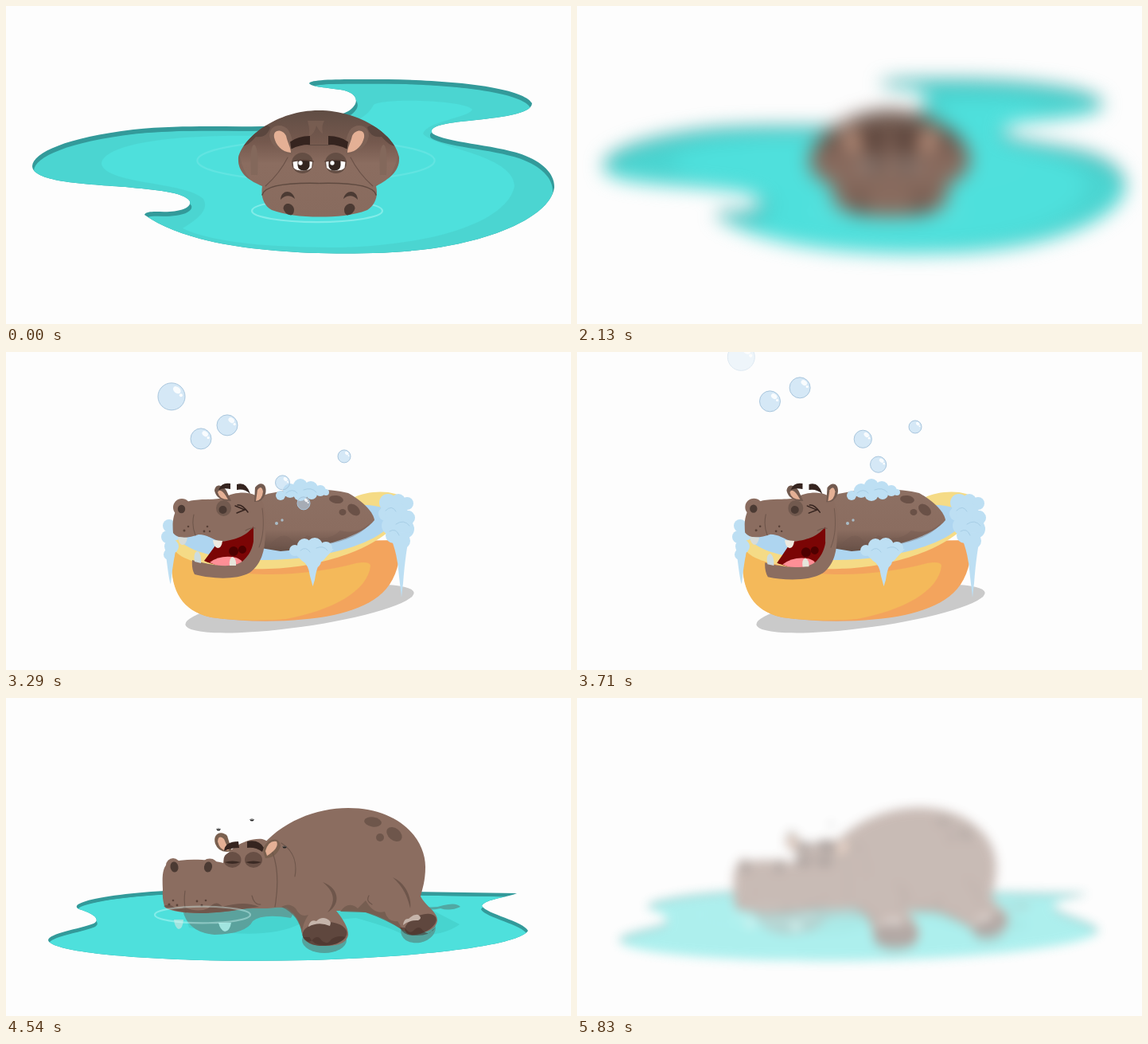
Write an HTML page that moves like this. It is 710x399 px and loops after 5870 ms.

```html
<!DOCTYPE html>
<html lang="en">
<head>
<meta charset="utf-8">
<title>Hippo bath</title>
<style>
  html, body { margin: 0; width: 100%; height: 100%; overflow: hidden; background: #fdfdfd; }
  svg { position: absolute; left: 0; top: 0; width: 710px; height: 399px; }
</style>
</head>
<body>
<script>
const LOOP = 5870;
const SKIN = '#8b6d60', SHADE = '#6e564b', DARK = '#4b3a33', BROW = '#35241f', PINK = '#e4b095';
const WATER = '#4ee0dc', EDGE = '#339a9a', FOAM = '#bddff3';

const path = (d, fill, more = '') => `<path d="${d}" fill="${fill}" ${more}/>`;
const line = (d, color = SHADE, w = 1.3) =>
  `<path d="${d}" fill="none" stroke="${color}" stroke-width="${w}" stroke-linecap="round"/>`;
const oval = (x, y, rx, ry, fill, rot = 0, more = '') =>
  `<ellipse cx="${x}" cy="${y}" rx="${rx}" ry="${ry}" fill="${fill}" transform="rotate(${rot} ${x} ${y})" ${more}/>`;
const group = (id, body) => `<g id="${id}">${body}</g>`;
const mirror = (s, axis) => `${s}<g transform="matrix(-1 0 0 1 ${2 * axis} 0)">${s}</g>`;
const blobs = (list, fill = FOAM) => list.map(([x, y, r]) => oval(x, y, r, r, fill)).join('');
const gradient = (id, stops) =>
  `<linearGradient id="${id}" x2="0" y2="1">${stops.map(([o, c]) =>
    `<stop offset="${o}" stop-color="${c}"/>`).join('')}</linearGradient>`;
const clip = (id, d, x = 0, y = 0) =>
  `<clipPath id="${id}"><path d="${d}" transform="translate(${x} ${y})"/></clipPath>`;

// The bank shows above the lowered water and a little on both sides.
const pool = (id, d, dx, dy, fill, inside = '') =>
  clip(id, d) + clip(id + 'Water', d, -dx, dy) + path(d, EDGE)
  + `<g clip-path="url(#${id})"><g clip-path="url(#${id}Water)">
     ${path(d, fill, `transform="translate(${dx} ${dy})"`)}${inside}</g></g>`;

// Scene 1: head in the pond
const POND = `M33 201C34 184 76 165 160 155C224 149 270 152 322 151C370 148 412 142 430 132
  C447 121 441 108 420 105C398 102 383 101 381 97C383 91 430 92 480 92C560 93 650 102 661 122
  C661 136 618 140 582 144C550 147 530 151 536 160C552 171 612 174 648 186C676 196 690 212 689 228
  C684 262 620 289 560 300C510 310 460 310.500 415 310.500C310 309 222 296 174 262C177 256 192 259 206 258
  C224 257 233 251 231 245C224 233 186 231 150 227C92 223 34 220 33 201Z`;
const POND_LIGHT = `M120 197C124 176 190 161 320 163C410 160 450 148 462 124C474 115 578 118 586 130
  C580 141 530 144 524 160C536 178 638 186 639 226C630 270 540 300 420 303C330 303 260 297 222 279
  C240 268 256 256 248 242C226 220 122 224 120 197Z`;
const FACE_BODY = `M322 226C300 217 291 206 292 190C298 165 340 131 393 131C446 131 490 163 494 190
  C495 207 482 217 465 226C468 238 464 250 454 256C436 263 415 264.500 394 264.500
  C370 264.500 350 262 334 256C323 250 320 238 322 226Z`;

const earFront = path('M331 163C331 149 347 146 355 156C362 168 361 180 359 187C343 184 333 175 331 163Z', '#7d6256')
  + path('M337 165C335 154 348 154 352 163C354 172 358 178 358 184C346 183 339 174 337 165Z', PINK);
const eyeFront = oval(372.500, 197, 13.500, 13, '#644e44')
  + path('M360.500 195Q373 192 385 195L384 203Q380 206.500 373 206.500Q364 206.500 361.500 203Z', '#fff')
  + path('M366.500 194Q374 192.500 381.500 194V201Q380 206.500 374 206.500Q367 206 366.500 200Z', '#33251f')
  + line('M360 195Q373 191.500 386 195', '#594239', 1.5);

const scene1 = `<defs>${gradient('skinTop', [[0, '#604d44'], [0.3, '#75594e'], [0.5, SKIN], [1, '#886b5e']])}</defs>`
  + pool('pond', POND, 2, 5.500, '#4bd5d1', path(POND_LIGHT, WATER) + group('bodyRings', '') + group('faceRings', ''))
  + clip('faceClip', FACE_BODY) + path(FACE_BODY, 'url(#skinTop)')
  + '<g clip-path="url(#faceClip)">'
  + mirror(path('M300 160Q322 144 332 152Q328 166 314 164Q304 176 296 176Z', '#5a463e')
    + path('M308 212Q306 174 312 174Q318 178 316 212Z', '#83685b')
    + path('M292 178Q298 222 322 225L318 230L288 222Z', '#735a4f', 'opacity=".35"'), 393)
  + path('M379 144Q383 158 380 164Q388 160 390 150Q394 158 398 160Q396 150 400 144Z', '#806458', 'opacity=".6"')
  + '</g>'
  + line('M380 174.500H407', '#5f4a41', 1)
  + mirror(line('M354 190Q344 210 326 226', '#6a5147', 1.1)
    + line('M322 237Q326 221 393 222.500', '#5f4a40', 1.5)
    + path('M345 243C346 230 360 230 363 242C356 236 350 238 345 243Z', DARK)
    + path('M348.500 254C349 246 360 246 362 255Q362 262 358 262.500Q350 261 348.500 254Z', DARK), 393.500)
  + group('face', mirror(earFront + eyeFront
    + path('M357 170.500Q367 163 382 163V174Q370 173.500 358.500 179.500Z', BROW), 393.500)
    + oval(370, 197, 2.700, 2.700, '#fff') + oval(410, 197, 2.700, 2.700, '#fff')
    + group('lids', mirror(path('M359 196A13.500 13 0 0 1 386 196Q373 205 359 196Z', '#6a5349'), 393.500)));

// Scene 2: laughing in the tub
const headBath = path(`M210 227C208 205 213 189 236 186C252 184 266 186 275 182C290 174 316 173 323 190
    C328 206 327 222 324 246L311 238V219C302 230 292 235 271 238C262 237 254 229 242 229
    C230 233 217 236 210 227Z`, SKIN)
  + path('M262 174C263 165 272 166 277 174L283 187Q265 187 262 174Z', '#725a4f')
  + path('M266 176Q269 170 276 180L279 185Q268 185 266 176Z', PINK)
  + path('M313 170C319 161 329 165 326 178Q322 189 312 188Z', '#725a4f')
  + path('M316 173Q321 166 323 175Q322 186 314 187Z', PINK)
  + path('M267 173Q271 163 282 165L282 172Q273 170 267 173Z', BROW)
  + path('M290 173V166Q302 162 307 178Q299 171 290 173Z', BROW)
  + oval(221, 195, 11, 11, SKIN) + oval(220.500, 197, 4.700, 5.200, DARK)
  + oval(273.500, 196, 9.500, 10, '#725a4f') + oval(272.500, 198, 5, 5, DARK)
  + line('M288 193L300 198L290 202M291 192Q297 191 304 201', BROW, 1.5)
  + line('M236 204Q233 218 238 230M301 224Q308 220 313 221', SHADE, 1.1)
  + line('M322 196Q326 225 318 245', '#735a4f', 1)
  + blobs([[224, 224, 1.5], [229, 219, 1.3], [249, 225, 1.4], [253, 219, 1.3], [256, 225, 1.2]], '#594238')
  + path('M260 236L272 237Q271 246 266 246Q261 245 260 236Z', '#eee9df')
  + path('M216 232L228 233Q226 243 221 242Q217 240 216 232Z', '#d7dcd9');
const jawBath = path('M311 217C315 247 308 269 290 270C270 270 258 266 249 262Q258 250 268 236Z', '#7b0505')
  + blobs([[286, 250, 6], [297, 248, 5]], '#4e0000')
  + path('M256 264Q270 254 289 258Q300 262 296 268Q276 274 256 264Z', '#ff8f96')
  + path(`M234 261C255 267 285 273 298 262C311 250 313 235 311 218L325 212C328 245 322 266 306 277
    C288 287 255 284 237 279Q233 272 234 261Z`, SKIN)
  + path('M237 263Q235 251 241 250Q246 253 245 265Z', '#ccdce0')
  + path('M281 268Q280 258 285 257Q290 260 289 268Z', '#e6e5db');

const scene2 = `<defs>${gradient('skinBack', [[0, '#8d7063'], [0.65, SKIN], [1, '#664f45']])}</defs>`
  + oval(369, 322, 145, 23, '#cacaca', -8)
  + path('M209 240C204 292 216 324 258 333C312 341 374 338 412 330C462 318 496 300 496 236Z', '#f3a45d')
  + path('M209 246C204 292 216 324 258 333C290 338 330 337 352 335C410 324 455 300 458 268Q457 262 440 265C360 286 260 286 209 246Z', '#f4b95a')
  + path(`M209 240C204 216 300 190 436 183C456 173 490 172 503 186C506 228 420 270 330 272
    C262 274 208 262 209 240Z`, '#f5db86')
  + path(`M214 230C260 200 380 190 450 192C480 192 490 205 486 213C470 240 400 260 330 261
    C270 262 222 250 214 230Z`, '#aed5f0')
  + blobs([[205, 218, 8], [203, 232, 8], [211, 227, 10], [208, 244, 9], [205, 254, 7]])
  + path('M200 246H214Q210 262 207 291Q205 290 200 246Z', FOAM)
  + path('M316 182C348 170 404 170 430 177C450 188 462 202 463 211C448 230 404 245 345 250L308 244Z', 'url(#skinBack)')
  + path('M330 244Q344 226 355 232Q368 246 378 230Q404 240 420 224Q442 230 458 214Q446 234 396 243Z', '#6f584d', 'opacity=".35"')
  + oval(415, 185, 9, 5, '#6a5147', 8) + oval(437, 198, 9, 6, '#6a5147', 40) + oval(423, 201, 4.500, 4, '#6a5147')
  + blobs([[340, 215, 2], [347, 211, 1.7]], '#a9bcc7')
  + blobs([[345, 180, 6], [357, 174, 9], [370, 168, 9], [383, 171, 9], [395, 174, 7], [402, 176, 4], [370, 178, 9], [384, 178, 7]])
  + line('M352 177Q360 170 366 177M374 173Q384 169 390 176', '#a7cee6', 1)
  + blobs([[363, 249, 7], [375, 243, 9], [388, 243, 10], [402, 246, 8], [380, 254, 10], [393, 253, 10], [386, 262, 10]])
  + path('M357 247H412L398 262Q391 265 388 286L385.500 294L382 281Q380 266 372 262Z', FOAM)
  + line('M370 249Q377 243 382 251M390 246Q399 242 404 249', '#a7cee6', 1)
  + blobs([[480, 189, 11], [493, 187, 9], [504, 190, 8], [477, 203, 9], [491, 203, 14], [505, 208, 9], [483, 218, 11],
    [501, 222, 12], [487, 230, 10], [498, 237, 10]])
  + path('M481 228L508 226Q502 250 499 290L497 308L494 282Q492 250 481 228Z', FOAM)
  + line('M477 199Q485 191 490 200M490 216Q500 209 507 218M482 225Q490 220 494 230', '#a7cee6', 1)
  + group('laugh', group('jaw', jawBath) + headBath)
  + group('bubbles', '');

// Scene 3: asleep in a puddle
const PUDDLE = `M53 304C54 295 92 290 110 283C121 277 106 269 92 265C75 257 126 246 200 242
  L510 243L642 245C630 250 600 253 598 261C604 271 650 280 656 292C644 311 520 325 380 329
  C220 333 58 322 53 304Z`;
const BODY = `M300 262L318 190C345 155 390 138 430 138C492 138 527 175 527 212C527 230 523 240 521 249
  C528 262 542 268 542 279C540 296 512 298 498 291C482 280 468 272 452 269C440 267 426 267 415 267
  C424 278 430 288 430 297C428 310 412 311 400 311C385 311 373 305 372 295C370 280 362 269 352 263Z`;
const MUZZLE = `M197 240C196 222 197 212 204 207C226 200 258 203 273 207C275 192 300 175 322 177
  C342 182 344 215 342 262C330 266 306 262 290 266C262 271 214 272 200 263Q196 254 197 240Z`;
const scallops = 'M198 261Q206 257 212 263Q220 266 224 262Q240 270 254 264Q264 252 272 262Q300 254 318 262Q300 264 284 267Q224 275 198 261Z';
const sleepEye = x => oval(x, 203, 11, 10, '#684f45')
  + path(`M${x - 10} 206Q${x} 203 ${x + 10} 206Q${x} 210 ${x - 10} 206Z`, '#3b2a24');
const foot = (x, y, rx, ry, rot) => oval(x, y, rx, ry, '#5f473e', rot)
  + path(`M${x - rx + 1} ${y + 4}q6 9 11 4q7 -8 12 0q7 7 12 -1q8 -6 ${rx * 2 - 38} -3q-8 11 -27 10q-14 0 -18 -10z`, '#453029', 'opacity=".55"');

const scene3 = pool('puddle', PUDDLE, 1, 4.500, WATER,
    path('M230 288Q330 306 372 282L440 276Q490 290 500 298Q550 300 570 284L520 258H220Z', '#45cfcb', 'opacity=".7"'))
  + path('M514 258Q532 266 550 260Q566 256 571 262Q558 268 546 264Q530 268 512 262Z', '#51a8a3')
  + oval(400, 304, 28, 16, '#53a39d') + oval(518, 291, 22, 16, '#53a39d', -12)
  + path('M222 266L346 258Q366 264 358 276Q322 270 310 280Q302 296 262 297Q228 294 222 266Z', '#5ba29d')
  + group('sleeper', path(BODY, SKIN)
    + path('M420 268Q430 254 442 264L452 254Q462 272 476 268Q480 282 492 280L500 292Q478 278 452 269Z', '#715a4e', 'opacity=".8"')
    + path('M346 262Q356 256 364 264Q370 276 380 272Q372 284 372 296Q368 272 346 262Z', '#705a4e', 'opacity=".7"')
    + oval(461, 155.500, 11, 6, SHADE, 8) + oval(488, 171, 11, 7.500, SHADE, 40) + oval(470, 175, 5, 5, SHADE)
    + path('M398 231C418 238 422 258 404 269C414 256 414 244 398 231Z', SHADE)
    + path('M486 225C502 232 510 250 508 264C504 248 500 238 486 225Z', SHADE)
    + line('M346 182C362 192 366 208 363 224M460 259Q452 255 456 248', SHADE, 1.2))
  + foot(400.500, 296, 28, 15, -3) + foot(521, 284, 21, 11, -24)
  + path('M380 287Q382 277 390 280Q396 274 403 277Q410 280 407 286Q393 280 380 287Z', '#c5b4aa')
  + path('M499 285Q500 276 506 277Q512 271 518 272Q524 276 518 279Q508 278 499 285Z', '#c5b4aa')
  + group('sleepHead', path('M263 183C259 171 270 165 278 173L284 192Q268 196 263 183Z', '#79604f')
    + path('M266 180Q267 171 274 177L280 191Q269 193 266 180Z', PINK)
    + path(MUZZLE, SKIN) + oval(210, 210, 9, 9, SKIN) + oval(256, 210, 10, 8.500, SKIN)
    + sleepEye(284.500) + sleepEye(311)
    + path('M274 192Q275 180 292 180L293 188Q282 188 274 192Z', BROW)
    + path('M303 188V180Q318 177 324 188L322 193Q314 187 303 188Z', BROW)
    + path('M323 192C324 178 344 171 345 186C342 196 334 201 326 201Z', '#79604f')
    + path('M326 192Q330 178 340 180Q344 188 328 198Z', PINK)
    + oval(211.500, 212, 5, 6.500, DARK, -10) + oval(254, 212, 5, 6.500, DARK, 10)
    + path(scallops, '#70574c')
    + line('M225 242Q223 256 226 269M335 194C344 218 341 244 338 262M309 248Q312 260 320 259', SHADE, 1.2)
    + blobs([[205, 259, 1.5], [210, 254, 1.3], [215, 260, 1.4], [240, 255, 1.4], [246, 260, 1.5], [251, 254, 1.3]], '#5a4339'))
  + path('M211 278H223Q222 290 217 290Q212 288 211 278Z', '#a1e4df')
  + path('M267 282H283Q281 293 275 293Q269 291 267 282Z', '#a1e4df')
  + group('sleepRings', '')
  + [1, 2, 3].map(i => group('fly' + i, oval(0, 0.500, 2.300, 1, '#222') + line('M-2.500 -.5L-.5 -1.200M.5 -1.200L2.500 -.5', '#555', 0.8))).join('');

document.body.innerHTML = [scene1, scene2, scene3]
  .map((s, i) => `<svg id="scene${i}" viewBox="0 0 710 399">${s}</svg>`).join('');

const el = id => document.getElementById(id);
const scenes = [0, 1, 2].map(i => el('scene' + i));
const clamp = v => Math.max(0, Math.min(1, v));
const ramp = (t, a, b) => clamp((t - a) / (b - a));
const wave = (t, period) => (1 - Math.cos(2 * Math.PI * t / period)) / 2;

// Rings are born every 1680 ms and widen at a steady rate while fading.
function rings(id, x, y, t, birth, start, scale, alpha) {
  let out = '';
  for (let k = 0; k < 3; k++) {
    const age = t - birth - 1680 * k;
    if (age < 0 || age > 2400) continue;
    const rx = (start + 0.0274 * age) * scale;
    const a = alpha * (1 - age / 2400) * ramp(age, 0, 150);
    out += `<ellipse cx="${x}" cy="${y}" rx="${rx}" ry="${rx * 0.172}" fill="none"
      stroke="#d9fffd" stroke-opacity="${a}" stroke-width="2.200"/>`;
  }
  el(id).innerHTML = out;
}

// x, y and radius at 3290 ms, then drift and rise per second
const BUBBLES = [[208, 56, 17, -4, 118], [245, 109, 13, -6, 112], [278, 92, 13, 5, 112],
  [425, 131, 8, 0, 88], [347.5, 164, 9, 28, 130], [374, 190, 8, 11, 116]];
function bubbles(t) {
  const s = (t - 3290) / 1000;
  el('bubbles').innerHTML = BUBBLES.map(([x, y, r, drift, rise], i) => {
    const bx = x + drift * s, by = y - rise * s, size = r + (i > 3 ? 5 * s : 0);
    const a = clamp((by + 5) / 30) * clamp((205 - by) / 12);
    if (a <= 0 || size <= 0) return '';
    return `<g opacity="${a}">` + oval(bx, by, size, size, '#b9d9f1', 0, 'fill-opacity=".58" stroke="#a9c6dd" stroke-width="1"')
      + oval(bx + size * 0.4, by - size * 0.48, size * 0.32, size * 0.23, '#fff', 40, 'opacity=".85"')
      + oval(bx + size * 0.7, by - size * 0.1, size * 0.12, size * 0.12, '#fff') + '</g>';
  }).join('');
}

function draw(t) {
  const swap1 = ramp(t, 2140, 2240), swap2 = ramp(t, 4050, 4150), out = ramp(t, 5620, 5840);
  const alpha = [1 - swap1, swap1 * (1 - swap2), swap2 * (1 - 0.57 * out)];
  const blur = t < 2140 ? 11.5 * ramp(t, 1800, 2130)
    : t < 3000 ? 11.5 * (1 - ramp(t, 2160, 2470))
    : t < 4050 ? 9.5 * ramp(t, 3740, 4040)
    : t < 4500 ? 9.5 * (1 - ramp(t, 4060, 4350)) : 6.5 * out;
  scenes.forEach((s, i) => {
    s.style.visibility = alpha[i] > 0 ? 'visible' : 'hidden';
    s.style.opacity = alpha[i];
    s.style.filter = blur > 0.05 ? `blur(${blur}px)` : 'none';
  });

  if (alpha[0] > 0) {
    rings('faceRings', 391, 257, t, -800, 60, 1, 0.55);
    rings('bodyRings', 389.5, 194, t, -800, 60, 1.82, 0.2);
    el('face').setAttribute('transform', `translate(0 ${2.5 * wave(t, 2260)})`);
    el('lids').setAttribute('opacity', t > 520 && t < 660 ? 1 : 0);
  }
  if (alpha[1] > 0) {
    const open = wave(t - 3290, 500);
    el('laugh').setAttribute('transform', `translate(${5 * open} ${open}) rotate(${1.5 * open} 315 225)`);
    el('jaw').setAttribute('transform', `rotate(${-11 * open} 316 232)`);
    bubbles(t);
  }
  if (alpha[2] > 0) {
    rings('sleepRings', 247, 272, t, 3940, 43.5, 1, 0.5);
    const breath = wave(t - 4540, 1800);
    el('sleeper').setAttribute('transform', `translate(0 ${-1.6 * breath}) scale(1 ${1 + 0.006 * breath})`);
    el('sleepHead').setAttribute('transform', `translate(0 ${0.8 * breath})`);
    const u = (t - 4540) / 1000;
    [[267, 165], [309, 153], [350, 187]].forEach(([x, y], i) => {
      const fx = x + (8 + 2 * i) * Math.sin(u * (5 + i)), fy = y + 5 * Math.sin(u * (7 - i));
      el('fly' + (i + 1)).setAttribute('transform', `translate(${fx} ${fy})`);
    });
  }
}

const begin = performance.now();
function tick() {
  draw((performance.now() - begin) % LOOP);
  requestAnimationFrame(tick);
}
tick();
</script>
</body>
</html>
```
